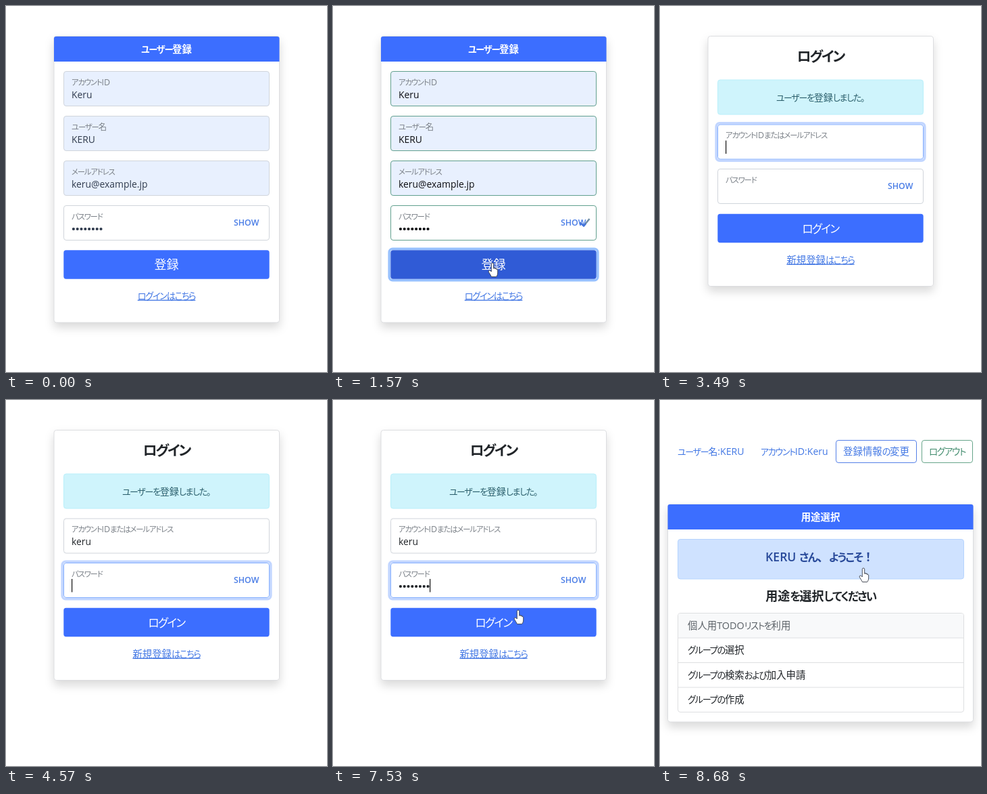
An HTML page that plays this animation: 475 by 540 pixels, repeating every 9.29 s.

```html
<!DOCTYPE html>
<html lang="ja">
<head>
<meta charset="utf-8">
<style>
html, body { margin: 0; width: 100%; height: 100%; overflow: hidden; background: #fff; }
svg { display: block; width: 475px; height: 540px; }
text { font-family: "Open Sans", "Noto Sans CJK JP", "Noto Sans CJK", sans-serif; white-space: pre; }
.kana { font-size: .92em; letter-spacing: -.1em; font-feature-settings: "palt"; }
.card { filter: drop-shadow(0 7px 7px rgba(0, 0, 0, .15)); }
</style>
</head>
<body>
<svg id="stage" viewBox="0 0 475 540"></svg>
<script>
const LOOP = 9290, LOGIN = 1710, HOME = 7880;
const BLUE = '#3c6eff', HOVER = '#305bd6', INK = '#212529', GREY = '#7b8188';
const LINK = '#4277e4', LINE = '#d0d5db', GREEN = '#62a08e';
const ID_KEYS = [3760, 3850, 4090, 4210];
const PASS_KEYS = [5170, 5290, 5500, 5640, 5810, 5930, 6050, 6300];
const USER = 'keru';
const stage = document.getElementById('stage');
const ruler = document.createElement('canvas').getContext('2d');

const ramp = (t, start, len = 150) => Math.min(1, Math.max(0, (t - start) / len));
const ease = k => k * k * (3 - 2 * k);
const within = (t, ...spans) => spans.some(([a, b]) => t >= a && t < b);
const mix = (a, b, k) => `color-mix(in srgb, ${b} ${k * 100}%, ${a})`;
const typed = (t, keys) => keys.filter(k => t >= k).length;

const rect = (x, y, w, h, fill, line = 'none', r = 3.6, extra = '') =>
  `<rect x="${x}" y="${y}" width="${w}" height="${h}" rx="${r}" fill="${fill}" stroke="${line}" ${extra}/>`;

function text(s, x, y, size, fill, extra = '') {
  const body = s.replace(/[ぁ-んァ-ヶー。]+/g, '<tspan class="kana">$&</tspan>');
  return `<text x="${x}" y="${y}" font-size="${size}" fill="${fill}" ${extra}>${body}</text>`;
}
const centered = (s, x, y, size, fill, extra = '') =>
  text(s, x, y, size, fill, 'text-anchor="middle" ' + extra);
const link = (s, y, fill) => centered(s, 237.5, y, 14.4, fill, 'text-decoration="underline"');

const card = (x, y, w, h) => rect(x, y, w, h, '#fff', '#dcdde0', 3.6, 'class="card"');
const header = (s, x, y, w) =>
  `<path d="M${x} ${y + 37}v-34q0-3 3-3h${w - 6}q3 0 3 3v34z" fill="${BLUE}"/>` +
  centered(s, 237.5, y + 23.5, 14.4, '#fff', 'font-weight="700"');

const ring = (x, y, w, h, color, k) =>
  k ? rect(x - 1.8, y - 1.8, w + 3.6, h + 3.6, 'none', color, 5, `stroke-width="3.6" opacity="${k}"`) : '';

function field(label, y, {fill = '#fff', line = LINE, focus = 0, value = '', ink = INK} = {}) {
  return ring(85, y - .5, 305, 52, '#c2d6ff', focus) +
    rect(85.5, y, 304, 51, fill, mix(line, '#86b0fe', focus)) +
    text(label, 97, y + 20, 12.4, GREY) + text(value, 97, y + 39, 13.9, ink);
}

const caret = (x, y) => rect(x, y + 23.5, 1.2, 19.5, '#111', 'none', 0);
const show = y => text('SHOW', 337, y + 29.5, 12.4, '#4a7de6', 'font-weight="600"');

function dots(n, y, ink) {
  let s = '';
  for (let i = 0; i < n; i++) s += `<circle cx="${99.9 + 5.8 * i}" cy="${y + 34.5}" r="2.1" fill="${ink}"/>`;
  return s;
}

const button = (label, y, hover, focus) =>
  ring(85, y, 305, 43, '#98c1fe', focus) +
  rect(85.3, y + .3, 304.4, 42.4, mix(BLUE, HOVER, hover)) +
  centered(label, 237.5, y + 28, 18, '#fff');

const hand = (x, y) => `<path transform="translate(${x} ${y})" fill="#fff" stroke="#3a3f4a" stroke-width=".9"
  d="M-1.7 13V1.7a1.7 1.7 0 0 1 3.4 0V8.5q.3-1.8 2.1-.9V9q.6-1.6 2.1-.6v1.6q.9-1.2 1.8.2V15q0 3-2 5.5H-1.5Q-3 17.5-5.8 13.2q-.4-2 1.4-2.2 1.3.2 2.7 2z"/>`;

function glide([x0, y0], [x1, y1], k) {
  k = ease(k);
  return hand(x0 + (x1 - x0) * k, y0 + (y1 - y0) * k);
}

function register(t) {
  const ink = mix('#2f3a4c', '#0c0d10', ramp(t, 140));
  const line = mix(LINE, GREEN, ramp(t, 1400));
  const filled = {fill: '#e8f0fe', line, ink};
  let s = card(71, 44.5, 333.5, 422.5) + header('ユーザー登録', 71, 45, 333.5) +
    field('アカウントID', 96.5, {...filled, value: 'Keru'}) +
    field('ユーザー名', 162.5, {...filled, value: 'KERU'}) +
    field('メールアドレス', 228.5, {...filled, value: 'keru@example.jp'}) +
    field('パスワード', 294.5, {line, focus: ramp(t, 140) - ramp(t, 1360)}) +
    dots(8, 294.5, ink) + show(294.5);
  const check = ramp(t, 1400);
  if (check) s += `<g fill="none" stroke-width="2.6" opacity="${check}">
    <path d="M379.5 314l-8.5 10.5" stroke="#728fa5"/><path d="M365.5 319.5l5.5 5 3-3.5" stroke="#4474dc"/></g>`;
  if (within(t, [140, 640], [1170, 1350])) s += caret(143, 294.5);
  s += button('登録', 360, ramp(t, 540, 140), ramp(t, 1360)) + link('ログインはこちら', 432.5, LINK);
  if (t >= 450) s += glide([205, 325], [236, 379], ramp(t, 450, 220));
  return s;
}

function login(t) {
  const chars = typed(t, ID_KEYS), marks = typed(t, PASS_KEYS);
  const id = USER.slice(0, chars);
  let s = card(71, 44.5, 333.5, 369) +
    centered('ログイン', 237.5, 82, 22.5, INK, 'font-weight="600"') +
    rect(85.5, 109, 304, 51, '#cff4fc', '#b9effa') +
    centered('ユーザーを登録しました。', 237, 139.5, 14.1, '#2b5f6c') +
    field('アカウントIDまたはメールアドレス', 175, {focus: ramp(t, 3350, 140) - ramp(t, 4420), value: id}) +
    field('パスワード', 240.5, {focus: ramp(t, 4420) - ramp(t, 7700)}) +
    dots(marks, 240.5, INK) + show(240.5) +
    button('ログイン', 306.5, ramp(t, 7540), ramp(t, 7700)) +
    link('新規登録はこちら', 379.5, t < 3100 ? '#2f58b8' : LINK);
  if (within(t, [3350, 4420])) {
    ruler.font = '13.9px "Open Sans"';
    s += caret(97 + ruler.measureText(id).width, 175);
  }
  if (within(t, [4420, 4930], [5170, 6830], [7370, 7700])) s += caret(97 + 5.75 * marks, 240.5);
  if (t < 3100) s += glide([236, 379], [209, 241], ramp(t, 2140, 200));
  if (t >= 7420) s += glide([209, 241], [274, 310], ramp(t, 7400, 130));
  return s;
}

function home(t) {
  const rows = ['個人用TODOリストを利用', 'グループの選択', 'グループの検索および加入申請', 'グループの作成'];
  let s = text('ユーザー名:KERU', 26, 81, 14.1, LINK) + text('アカウントID:Keru', 149, 81, 14.1, LINK) +
    rect(260.5, 59.5, 119, 33, '#fff', '#5580e8') + centered('登録情報の変更', 320, 81, 14.4, LINK) +
    rect(387.5, 59.5, 75, 33, '#fff', '#67a58a') + centered('ログアウト', 425, 81, 14.8, '#458e70') +
    card(11.5, 154, 452, 321) + header('用途選択', 11.5, 154, 452) +
    rect(26.5, 205.5, 423, 58.5, '#cfe2ff', '#b6d4fe') +
    centered('KERU さん、ようこそ！', 236.5, 237.5, 17.6, '#294a9a', 'font-weight="600"') +
    centered('用途を選択してください', 238, 295.5, 18, INK, 'font-weight="600"') +
    rect(26.5, 314.5, 423, 146, '#fff', '#dedfe1') +
    rect(27, 315, 422, 36, '#f8f9fa', 'none', 3);
  rows.forEach((row, i) => {
    const y = 314.5 + 36.5 * i;
    if (i) s += `<path d="M26.5 ${y}h423" stroke="#dedfe1"/>`;
    s += text(row, 41, y + 23, 14.4, i ? INK : '#5c6268');
  });
  return s + glide([273, 301], [301, 248], ramp(t, 8610, 70));
}

function draw(now) {
  const t = now % LOOP;
  stage.innerHTML = t < LOGIN ? register(t) : t < HOME ? login(t) : home(t);
  requestAnimationFrame(draw);
}
draw(0);
</script>
</body>
</html>
```
